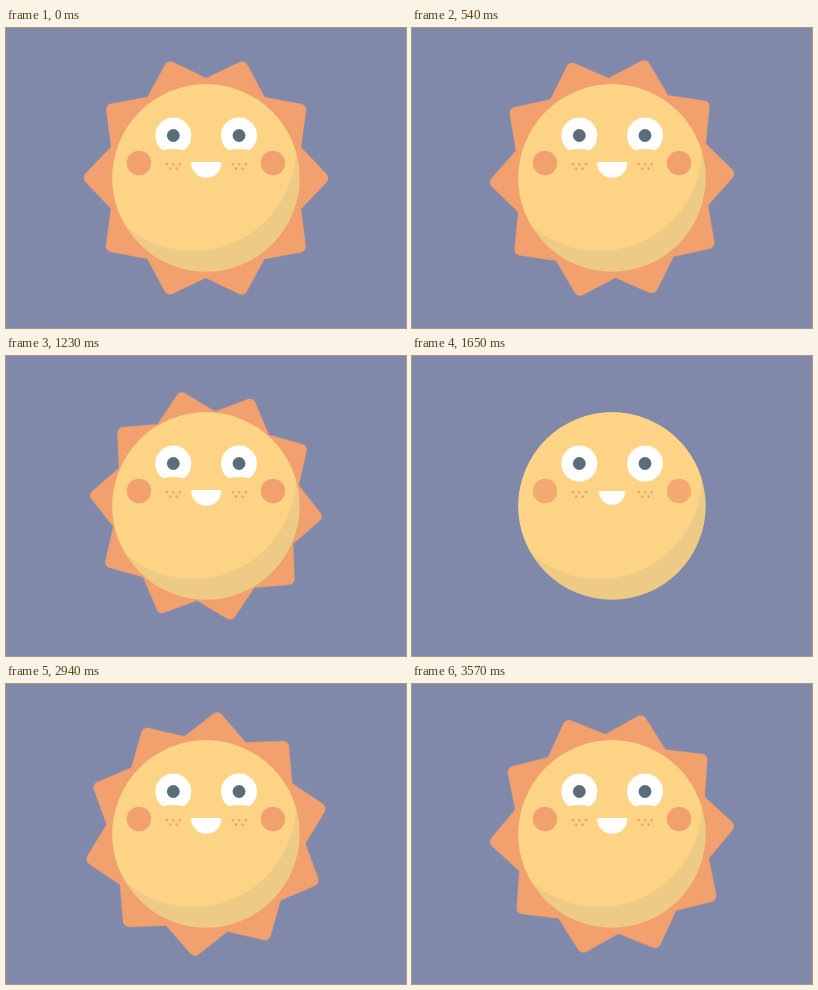
An HTML page for the animation above (3600 ms loop, 400 by 300 pixels).

```html
<!DOCTYPE html>
<html lang="en">
<head>
<meta charset="utf-8">
<title>Sun</title>
<style>
  html, body { margin: 0; height: 100%; overflow: hidden; background: #8189aa; }
  svg { display: block; width: 100vw; height: 100vh; }

  .spin, .rays, .pupils, .lids, .cheeks, .mouth {
    animation: 3600ms cubic-bezier(.333, 0, .667, 1) infinite;
  }
  .spin { animation-name: spin; }
  .rays { animation-name: rays; fill: #f2a06d; stroke: #f2a06d; stroke-width: 12; stroke-linejoin: round; }
  .pupils { animation-name: look; fill: #5a6d79; }
  .lids { animation-name: lids; fill: #fdd485; }
  .cheeks { animation-name: blush; fill: #f2a06d; }
  .mouth { animation-name: smile; fill: #fff; }
  .freckles { fill: #f2a06d; }

  /* the spin slows slightly while the rays are away */
  @keyframes spin {
    0% { transform: rotate(0deg); animation-timing-function: cubic-bezier(.333, .393, .667, .726); }
    50% { transform: rotate(206.85deg); animation-timing-function: cubic-bezier(.333, .32, .667, .654); }
    100% { transform: rotate(432deg); }
  }
  @keyframes rays {
    0%, 32.92% { transform: scale(1); }
    42.5%, 67.08% { transform: scale(0); }
    76.67% { transform: scale(1.05); }
    80.83%, 100% { transform: scale(1); }
  }
  @keyframes look {
    0%, 47.2% { transform: translateX(0); }
    52.8%, 75% { transform: translateX(-5px); }
    80.56%, 100% { transform: translateX(0); }
  }
  @keyframes lids {
    0%, 38.9% { transform: translateY(0); }
    44.17%, 75% { transform: translateY(6px); }
    80%, 100% { transform: translateY(0); }
  }
  @keyframes blush {
    0%, 43.06% { opacity: 1; }
    51.39%, 74.58% { opacity: .3; }
    81.67%, 100% { opacity: 1; }
  }
  @keyframes smile {
    0%, 43.06% { transform: scale(1); }
    51.39%, 74.58% { transform: scale(.5); }
    81.67%, 100% { transform: scale(1); }
  }
</style>
</head>
<body>
<svg viewBox="0 0 400 300">
  <defs>
    <clipPath id="disc"><circle cx="200" cy="150" r="93.7"/></clipPath>
    <g id="dots">
      <circle cx="-6.3" r="1.3"/><circle r="1.3"/><circle cx="6.5" r="1.3"/>
      <circle cx="-3" cy="4.4" r="1.3"/><circle cx="3.4" cy="4.4" r="1.3"/>
    </g>
  </defs>

  <g transform="translate(200 150)">
    <g class="spin"><polygon class="rays" id="star"/></g>
  </g>

  <circle cx="200" cy="150" r="93.7" fill="#edcb87"/>
  <circle cx="187" cy="120" r="103" fill="#fdd485" clip-path="url(#disc)"/>

  <g fill="#fff">
    <circle cx="167.3" cy="107.5" r="18"/>
    <circle cx="233" cy="107.5" r="18"/>
  </g>
  <g class="pupils">
    <circle cx="167.3" cy="107.5" r="6.4"/>
    <circle cx="233" cy="107.5" r="6.4"/>
  </g>
  <g class="lids">
    <ellipse cx="167.3" cy="129" rx="18" ry="8"/>
    <ellipse cx="233" cy="129" rx="18" ry="8"/>
  </g>

  <g class="cheeks">
    <circle cx="133" cy="135" r="12.2"/>
    <circle cx="267" cy="135" r="12.2"/>
  </g>
  <g class="freckles">
    <use href="#dots" x="167.3" y="136.2"/>
    <use href="#dots" x="233.2" y="136.2"/>
  </g>
  <g transform="translate(200.2 142)">
    <path class="mouth" d="M-14 -8H14Q15 -8 15 -7A15 14.7 0 0 1 -15 -7Q-15 -8 -14 -8Z"/>
  </g>
</svg>
<script>
  const TIPS = 10, TIP = 116.2, VALLEY = 93.3;
  const corner = (_, i) => {
    const a = i * Math.PI / TIPS, r = i % 2 ? VALLEY : TIP;
    return `${(r * Math.cos(a)).toFixed(2)},${(r * Math.sin(a)).toFixed(2)}`;
  };
  document.getElementById('star')
    .setAttribute('points', Array.from({ length: TIPS * 2 }, corner).join(' '));
</script>
</body>
</html>
```
